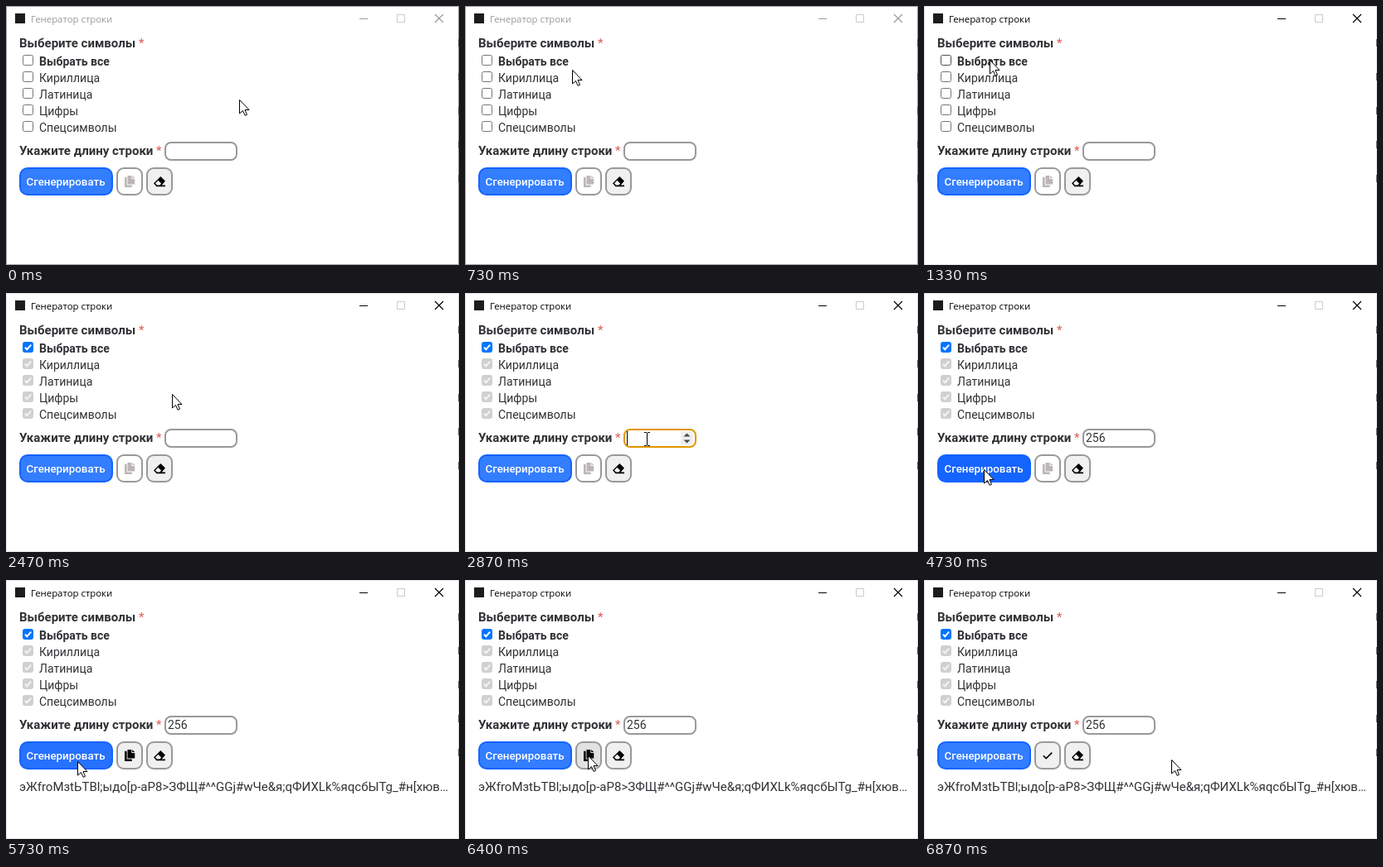
Write an HTML page with a canvas that moves like this. It is 546 px wide and 313 px high and loops after 8000 ms.

```html
<!DOCTYPE html>
<html lang="ru">
<head>
<meta charset="utf-8">
<title>Генератор строки</title>
<style>
html, body { margin: 0; width: 100%; height: 100%; overflow: hidden; background: #fff; }
canvas { display: block; }
</style>
</head>
<body>
<canvas id="stage" width="546" height="313"></canvas>
<script>
const ctx = document.getElementById('stage').getContext('2d');
const LOOP = 8000, TICK = 1000 / 15;
const INK = '#303235', LINE = '#999', RED = '#dc5a55', BLUE = '#1464ff';
const LABELS = ['Выбрать все', 'Кириллица', 'Латиница', 'Цифры', 'Спецсимволы'];
const RESULT = 'эЖfroMзtЬTBl;ыдо[p-aP8>ЗФЩ#^^GGj#wЧе&я;qФИХLk%яqсбЫTg_#н[хюв…';

// Icons on a 512 unit grid, arrow in pixels
const COPY = new Path2D('M0 64H96V416H320V512H0Z M128 0H304V144H448V384H128Z M336 0 448 112H336Z');
const ERASER = new Path2D('M0 336 304 32 512 240 356 416H512V480H124Z M195 211 333 349 265 416H151L71 336Z');
const ARROW = new Path2D('M0 0V16.5L4 13 6.6 18.8 9 17.8 6.5 12H11.5Z');

const START = { x: 281, y: 113 };
const MOVES = [
  { from: 400, to: 1067, x: 79, y: 65 },
  { from: 1600, to: 1800, x: 185, y: 80 },
  { from: 2400, to: 2667, x: 219, y: 176 },
  { from: 4133, to: 4667, x: 72, y: 213 },
  { from: 5700, to: 6067, x: 148, y: 212, bend: 12 },
  { from: 6533, to: 6867, x: 298, y: 217 }
];

const easeOut = u => u * (2 - u);

function pointerAt(t) {
  let { x, y } = START;
  for (const m of MOVES) {
    const e = easeOut(Math.min(1, Math.max(0, (t - m.from) / (m.to - m.from))));
    x += (m.x - x) * e;
    y += (m.y - y) * e + (m.bend || 0) * Math.sin(Math.PI * e);
  }
  return [Math.round(x), Math.round(y)];
}

function text(str, x, y, size, color = INK, weight = 400, family = 'Roboto') {
  ctx.font = `${weight} ${size}px "${family}", sans-serif`;
  ctx.fillStyle = color;
  ctx.fillText(str, x, y);
}

function rect(x, y, w, h, color) {
  ctx.fillStyle = color;
  ctx.fillRect(x, y, w, h);
}

function stroke(d, color, width, x = 0, y = 0) {
  ctx.save();
  ctx.translate(x, y);
  ctx.strokeStyle = color;
  ctx.lineWidth = width;
  ctx.stroke(new Path2D(d));
  ctx.restore();
}

function icon(path, x, y, color) {
  ctx.save();
  ctx.translate(x, y);
  ctx.scale(14 / 512, 14 / 512);
  ctx.fillStyle = color;
  ctx.fill(path, 'evenodd');
  ctx.restore();
}

function box(x, y, w, h, r, fill, border, width = 2) {
  const d = width / 2;
  ctx.beginPath();
  ctx.roundRect(x + d, y + d, w - width, h - width, r - d);
  ctx.fillStyle = fill;
  ctx.fill();
  ctx.strokeStyle = border;
  ctx.lineWidth = width;
  ctx.stroke();
}

function drawWindow(active) {
  const color = active ? '#000' : '#999';
  box(0, 0, 546, 313, 1, '#fff', active ? '#e4e4e4' : '#a3a3a3', 1);
  for (let y = 40; y < 230; y += 41) rect(545, y, 1, 9, '#666');
  rect(11, 9, 12, 12, '#1c1c1c');
  text('Генератор строки', 30, 20, 11.4, color, 400, 'Open Sans');
  stroke('M0 5.5h10', color, 1, 426, 10);
  stroke('M.5 .5h9v9h-9z', '#ccc', 1, 471, 10);
  stroke('M0 0 10 10M10 0 0 10', color, 1.2, 517, 10);
}

function drawCheck(y, checked, disabled, hover) {
  if (!checked) {
    box(20, y, 13, 13, 2.5, '#fff', hover ? '#4f4f4f' : '#767676', 1);
    return;
  }
  const fill = disabled ? '#d0d0d0' : hover ? '#005cc8' : '#0075ff';
  box(20, y, 13, 13, 2.5, fill, fill, 1);
  stroke('M3 6.8 5.3 9.2 10.2 3.6', disabled ? '#f4f4f4' : '#fff', 2, 20, y);
}

function drawInput(value, hover, focus, caret) {
  box(191, 164, 88, 23, 8, '#fff', focus ? '#e09600' : LINE);
  text(value, 195, 180, 14);
  if (caret) rect(195 + Math.round(ctx.measureText(value).width), 167, 1, 17, '#000');
  if (!hover) return;
  rect(260, 167, 15, 17, '#efefef');
  ctx.fillStyle = '#4b4b4b';
  ctx.fill(new Path2D('M263.5 173.5l4-4 4 4zM263.5 177.5l4 4 4-4z'));
}

function drawPointer(x, y, beam) {
  if (beam) {
    stroke('M-3 -7.5h3m1 0h3M.5 -7v15M-3 8.5h3m1 0h3', '#000', 1, x, y);
    return;
  }
  ctx.save();
  ctx.translate(x + 0.5, y + 0.5);
  ctx.fillStyle = '#fff';
  ctx.fill(ARROW);
  ctx.strokeStyle = '#000';
  ctx.lineWidth = 1;
  ctx.stroke(ARROW);
  ctx.restore();
}

function draw(now) {
  const t = Math.floor((now + 4) / TICK) * TICK + 1;
  const during = (from, to) => t >= from && t < to;
  const [px, py] = pointerAt(t);
  const over = (x, y, w, h) => px >= x && px < x + w && py >= y && py < y + h;

  drawWindow(t >= 1330);
  text('Выберите символы', 16, 50, 15, INK, 700);
  text('*', 160, 50, 15, RED);
  LABELS.forEach((label, i) => {
    const y = 59 + 20 * i;
    drawCheck(y, t >= 1465, i > 0, i === 0 && over(16, 57, 110, 20));
    text(label, 40, y + 13, 14, INK, i ? 400 : 700);
  });

  text('Укажите длину строки', 16, 180, 15, INK, 700);
  text('*', 181, 180, 15, RED);
  const typed = Math.min(3, Math.max(0, Math.floor((t - 3397) / 133)));
  const blinkStart = typed ? 3800 : 2865;
  const focus = during(2865, 4730);
  const caret = focus && (t < blinkStart || Math.floor((t - blinkStart) / 530) % 2 === 0);
  const overInput = over(191, 164, 88, 23);
  drawInput('256'.slice(0, typed), overInput, focus, caret);

  const fill = during(4730, 4865) ? BLUE : over(16, 195, 113, 34) ? '#2771ff' : '#337dff';
  box(16, 195, 113, 34, 10, fill, BLUE);
  text('Сгенерировать', 24.5, 217, 13.33, '#fff', 500);

  const ready = t >= 4865;
  const paper = !ready ? '#fff' : during(6400, 6530) ? '#e2e2e2' : '#f0f0f0';
  box(133, 195, 32, 34, 9, paper, LINE);
  if (t >= 6530) stroke('M0 4 3.4 7.3 10.4 .3', '#000', 1.6, 143.8, 208.3);
  else icon(COPY, 143, 205, ready ? '#000' : '#bcb6b6');
  box(169, 195, 32, 34, 9, '#f0f0f0', LINE);
  icon(ERASER, 178, 205, '#000');

  if (ready) text(RESULT, 16, 255, 15);
  drawPointer(px, py, overInput);
}

const start = performance.now();
function frame() {
  draw((performance.now() - start) % LOOP);
  requestAnimationFrame(frame);
}
frame();
</script>
</body>
</html>
```
